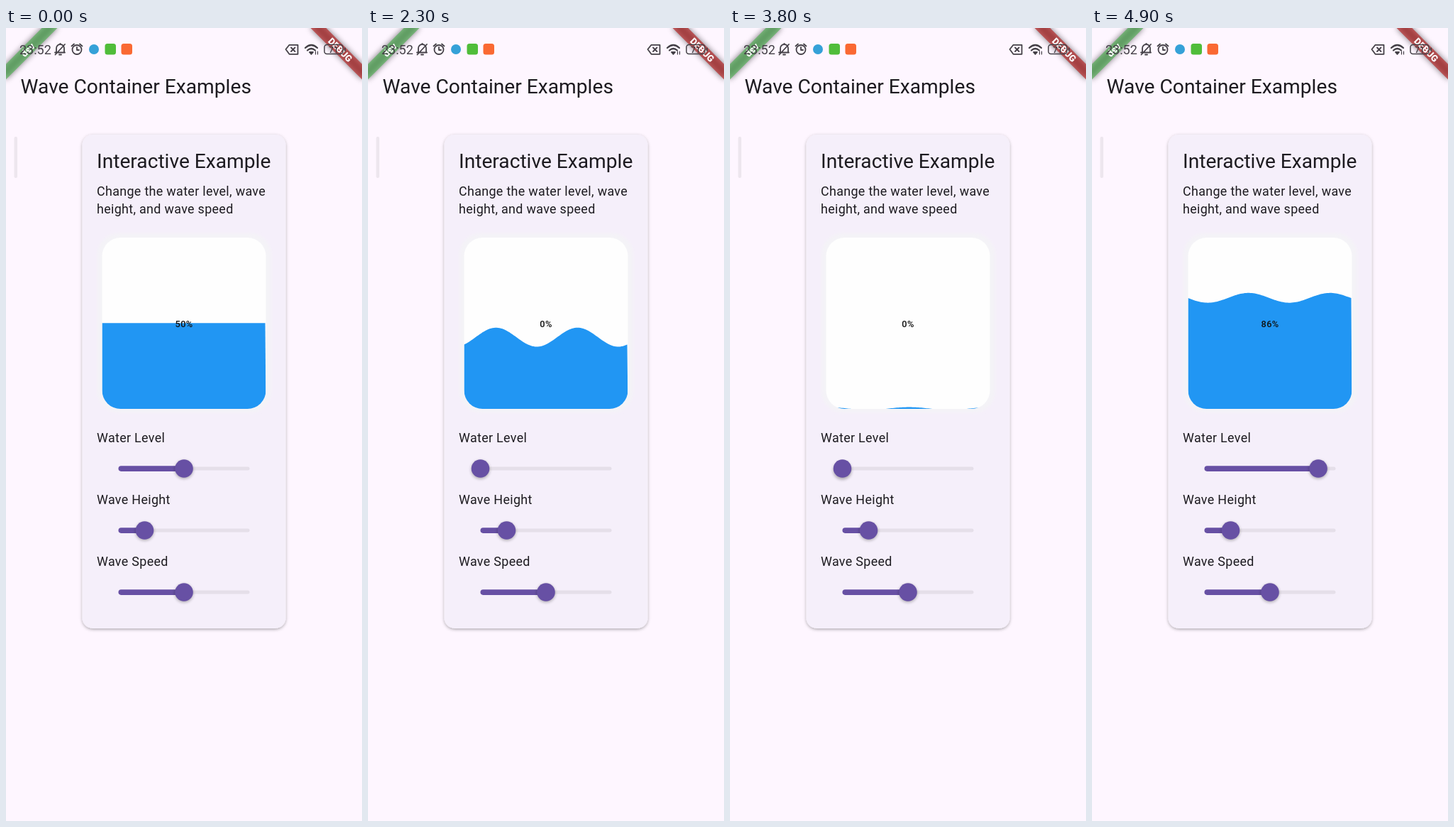
Recreate the animation shown at these times as an HTML page. Size 502 px wide and 1116 px high, loop 5000 ms.

```html
<!DOCTYPE html>
<html lang="en">
<head>
<meta charset="utf-8">
<title>Wave Container Examples</title>
<style>
html, body { margin: 0; width: 100%; height: 100%; overflow: hidden; background: #fef6ff; }
svg { display: block; width: 502px; height: 1116px; font-family: Roboto, sans-serif; fill: #1d1b20; }
.title { font-size: 28.16px; }
.body { font-size: 17.92px; letter-spacing: .32px; }
.ribbon { font-size: 13px; font-weight: 900; fill: #fff; text-anchor: middle; }
.line { fill: none; stroke: #444047; stroke-width: 1.8; stroke-linecap: round; stroke-linejoin: round; }
</style>
</head>
<body>
<svg viewBox="0 0 502 1116">
  <defs>
    <filter id="cardShadow" x="-10%" y="-10%" width="120%" height="120%">
      <feDropShadow dx="0" dy="1.5" stdDeviation="2" flood-opacity=".32"/>
    </filter>
    <filter id="soft" x="-30%" y="-60%" width="160%" height="220%"><feGaussianBlur stdDeviation="2"/></filter>
    <filter id="ribbonBlur" x="-20%" y="-100%" width="140%" height="300%"><feGaussianBlur stdDeviation="4"/></filter>
    <clipPath id="tank"><rect x="135.5" y="295" width="231" height="241" rx="26"/></clipPath>
  </defs>

  <rect width="502" height="1116" fill="#fef6ff"/>
  <rect x="11.5" y="153" width="4.5" height="58" rx="2" fill="#ede6ee"/>
  <text class="title" x="20.5" y="92">Wave Container Examples</text>

  <rect x="107.5" y="150" width="287" height="695" rx="15" fill="#f5effa" filter="url(#cardShadow)"/>
  <text class="title" x="128" y="197">Interactive Example</text>
  <text class="body" x="128" y="235.5">Change the water level, wave</text>
  <text class="body" x="128" y="261">height, and wave speed</text>

  <rect x="129" y="289" width="245" height="252" rx="30" fill="#f4f3f7" filter="url(#soft)"/>
  <g clip-path="url(#tank)">
    <rect x="135" y="295" width="232" height="242" fill="#fefefe"/>
    <path id="water" fill="#2196f3"/>
  </g>
  <text id="percent" x="251" y="421" font-size="12.8" font-weight="500" letter-spacing=".32" text-anchor="middle" fill="#111"></text>

  <g id="sliders"></g>

  <g transform="rotate(-45)">
    <rect x="-51" y="35.8" width="102" height="15.4" opacity=".5" fill="#000" filter="url(#ribbonBlur)"/>
    <rect x="-51" y="35.8" width="102" height="15.4" fill="#4caf50" fill-opacity=".63"/>
    <text class="ribbon" y="48">dev</text>
  </g>
  <g transform="translate(502 0) rotate(45)">
    <rect x="-51" y="35.8" width="102" height="15.4" opacity=".5" fill="#000" filter="url(#ribbonBlur)"/>
    <rect x="-51" y="35.8" width="102" height="15.4" fill="#b71c1c" fill-opacity=".63"/>
    <text class="ribbon" y="48">DEBUG</text>
  </g>

  <text x="19" y="36.5" font-size="18" fill="#444047">23:52</text>
  <g class="line">
    <path d="M69 34.5H83M71 34V28.500A5.500 5.500 0 0 1 82 28.500V34M75 37.500H78M76.500 22V23M69.500 37.500L83 23"/>
    <circle cx="100" cy="30.500" r="6.500"/>
    <path d="M100 27V31H103M92.500 25.500L96 22.500M104 22.500L107.500 25.500"/>
    <path d="M394.500 30L399.500 23.800H411.500V36.800H399.500ZM402 27.500L407.500 33M407.500 27.500L402 33"/>
    <path d="M422 28Q430.500 20 439 28M425 31.500Q430.500 26.500 436 31.500" stroke-width="2.200"/>
    <path d="M428 34L430.500 36.800L433 34Z" fill="#444047"/>
    <path d="M436.500 37V33M439.500 33V37" stroke-width="1.200"/>
    <rect x="449" y="23.500" width="26" height="13" rx="3.500" stroke-width="1.500"/>
    <path d="M478 28.500V32"/>
  </g>
  <text x="462" y="34.500" font-size="12" font-weight="500" text-anchor="middle" fill="#444047">71</text>
  <circle cx="124" cy="30" r="7" fill="#35a1d8"/>
  <rect x="139.500" y="22" width="15.500" height="15.500" rx="3.500" fill="#50bd3a"/>
  <rect x="162.500" y="22" width="15.500" height="15.500" rx="3.500" fill="#fa6933"/>
</svg>

<script>
const LOOP = 5000, STEP = 100;
const LEFT = 158.5, TRACK = 185;   // slider geometry
const TOP = 295, BOTTOM = 535.5;   // water tank
const DOWN = { from: 1450, to: 2009 }, UP = { from: 3820, to: 4100 };
const PURPLE = '#6750a4';

const $ = id => document.getElementById(id);
const clamp = v => Math.min(1, Math.max(0, v));
const ramp = (t, a, b) => clamp((t - a) / (b - a));
const ease = p => (1 - Math.cos(Math.PI * p)) / 2;

function slider(label, y, value) {
  const x = LEFT + TRACK * value;
  $('sliders').insertAdjacentHTML('beforeend', `
    <text class="body" x="128" y="${y - 37}">${label}</text>
    <rect x="${LEFT}" y="${y - 2.5}" width="${TRACK}" height="5.1" rx="2.5" fill="#e5dfe9"/>
    <rect class="active" x="${LEFT}" y="${y - 3.8}" width="${x - LEFT}" height="7.7" rx="3.8" fill="${PURPLE}"/>
    <g class="thumb" transform="translate(${x} ${y})">
      <circle class="halo" r="0" fill="${PURPLE}" fill-opacity=".1"/>
      <circle class="shade" cy="1.5" r="12.8" fill="#000" opacity=".3" filter="url(#soft)"/>
      <circle r="12.8" fill="${PURPLE}"/>
    </g>`);
}
slider('Water Level', 620, .5);
slider('Wave Height', 707, .2);
slider('Wave Speed', 794, .5);
const [active, thumb, halo, shade] =
  ['active', 'thumb', 'halo', 'shade'].map(c => document.querySelector('.' + c));

// Slider value, 0 to 1
const valueAt = t => .5 * (1 - ramp(t, DOWN.from, DOWN.to)) + .868 * ramp(t, UP.from, UP.to);

// The water follows after the drag ends
const levelAt = t => .5 * (1 - ease(ramp(t, 1980, 3180))) + .868 * ease(ramp(t, 4120, 5295));

// Waves rise on a drag and die away afterwards
function swellAt(t) {
  if (t < DOWN.from) return 0;
  const drag = t < UP.from ? DOWN : UP;
  return 19.5 * Math.exp(-Math.max(0, t - drag.to) / 770);
}

// 0 at rest, 1 while the thumb is held
const pressAt = t => [DOWN, UP].reduce((sum, d) =>
  sum + ramp(t, d.from - 60, d.from + 80) * (1 - ramp(t, d.to + 40, d.to + 300)), 0);

function drawWater(t) {
  const middle = BOTTOM - levelAt(t) * (BOTTOM - TOP);
  const crest = 192 - (t - 1900) * 230 / 8000;
  const swell = swellAt(t);
  let d = 'M135.5 537';
  for (let x = 135.5; x <= 365.5; x += 2) {
    const y = middle - swell * Math.cos((x - crest) * 2 * Math.PI / 115);
    d += `L${x} ${y.toFixed(2)}`;
  }
  $('water').setAttribute('d', d + 'L366.5 537Z');
}

function draw(t) {
  const value = valueAt(t), press = pressAt(t);
  drawWater(t);
  $('percent').textContent = Math.floor(value * 100 + 1e-6) + '%';
  active.setAttribute('width', TRACK * value);
  thumb.setAttribute('transform', `translate(${LEFT + TRACK * value} 620)`);
  halo.setAttribute('r', 30.7 * press);
  shade.setAttribute('cy', 1.5 + 4 * press);
}

const start = performance.now();
function tick() {
  const t = (performance.now() - start) % LOOP;
  draw(Math.floor(t / STEP) * STEP);
  requestAnimationFrame(tick);
}
tick();
</script>
</body>
</html>
```
